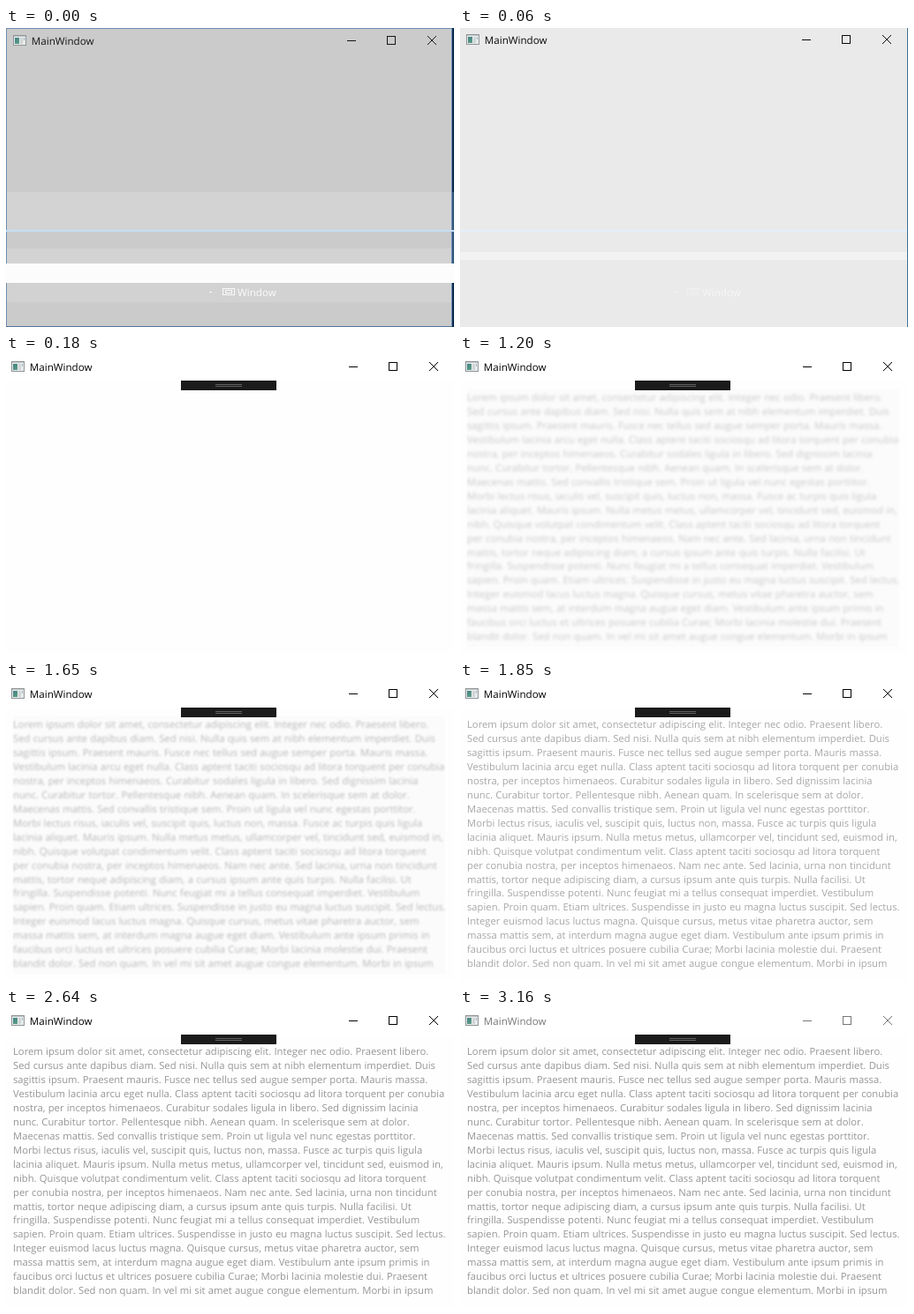
Recreate the animation shown at these times as an HTML page with a canvas. Size 507x339 px, loop 3.26 s.

```html
<!DOCTYPE html>
<html lang="en">
<head>
<meta charset="utf-8">
<title>MainWindow</title>
<style>
  html, body { margin: 0; width: 100%; height: 100%; overflow: hidden; background: #fff; }
  canvas { display: block; }
</style>
</head>
<body>
<canvas id="stage" width="507" height="339"></canvas>
<script>
const W = 507, H = 339, LOOP = 3260;
const FONT = '"Open Sans", "Noto Sans", sans-serif';
const ctx = document.getElementById('stage').getContext('2d');

const LINES = [
  'Lorem ipsum dolor sit amet, consectetur adipiscing elit. Integer nec odio. Praesent libero.',
  'Sed cursus ante dapibus diam. Sed nisi. Nulla quis sem at nibh elementum imperdiet. Duis',
  'sagittis ipsum. Praesent mauris. Fusce nec tellus sed augue semper porta. Mauris massa.',
  'Vestibulum lacinia arcu eget nulla. Class aptent taciti sociosqu ad litora torquent per conubia',
  'nostra, per inceptos himenaeos. Curabitur sodales ligula in libero. Sed dignissim lacinia',
  'nunc. Curabitur tortor. Pellentesque nibh. Aenean quam. In scelerisque sem at dolor.',
  'Maecenas mattis. Sed convallis tristique sem. Proin ut ligula vel nunc egestas porttitor.',
  'Morbi lectus risus, iaculis vel, suscipit quis, luctus non, massa. Fusce ac turpis quis ligula',
  'lacinia aliquet. Mauris ipsum. Nulla metus metus, ullamcorper vel, tincidunt sed, euismod in,',
  'nibh. Quisque volutpat condimentum velit. Class aptent taciti sociosqu ad litora torquent',
  'per conubia nostra, per inceptos himenaeos. Nam nec ante. Sed lacinia, urna non tincidunt',
  'mattis, tortor neque adipiscing diam, a cursus ipsum ante quis turpis. Nulla facilisi. Ut',
  'fringilla. Suspendisse potenti. Nunc feugiat mi a tellus consequat imperdiet. Vestibulum',
  'sapien. Proin quam. Etiam ultrices. Suspendisse in justo eu magna luctus suscipit. Sed lectus.',
  'Integer euismod lacus luctus magna. Quisque cursus, metus vitae pharetra auctor, sem',
  'massa mattis sem, at interdum magna augue eget diam. Vestibulum ante ipsum primis in',
  'faucibus orci luctus et ultrices posuere cubilia Curae; Morbi lacinia molestie dui. Praesent',
  'blandit dolor. Sed non quam. In vel mi sit amet augue congue elementum. Morbi in ipsum'
];

// Start time, blur radius and opacity of the paragraph
const FADE = [
  [1200, 1.6, .2], [1470, 1.55, .21], [1650, .9, .27], [1750, .4, .31],
  [1850, 0, .34], [1970, 0, .355], [2250, 0, .37], [2310, 0, .38],
  [2460, 0, .39], [2550, 0, .4], [2640, 0, .41]
];

function rect(x, y, w, h, color) {
  ctx.fillStyle = color;
  ctx.fillRect(x, y, w, h);
}

function text(c, str, x, y, size, color) {
  c.font = size + 'px ' + FONT;
  c.textRendering = 'geometricPrecision';
  c.fillStyle = color;
  c.fillText(str, x, y);
}

const paragraph = document.createElement('canvas');
paragraph.width = W;
paragraph.height = H;
const pen = paragraph.getContext('2d');
pen.wordSpacing = '0.35px';
LINES.forEach((line, i) => text(pen, line, 8, Math.round(51.95 + 15.961 * i), 11.26, '#000'));

function appIcon(x, y) {
  rect(x, y, 15, 12, '#8f9496');
  rect(x + 1, y + 1, 13, 10, '#e9ecec');
  rect(x + 1, y + 1, 13, 1, '#c3c9cb');
  const g = ctx.createLinearGradient(x, y + 3, x + 6, y + 10);
  g.addColorStop(0, '#3f7d84');
  g.addColorStop(1, '#5b9c86');
  rect(x + 2, y + 3, 5, 7, g);
  rect(x + 8, y + 3, 3, 7, '#d0d5d6');
  rect(x + 12, y + 3, 1, 3, '#9fb0c4');
}

// dx moves the left group, bx the buttons, dy the whole bar
function titleBar(dx, bx, dy, ink) {
  appIcon(6 + dx, 7 + dy);
  text(ctx, 'MainWindow', 26.8 + dx, 18 + dy, 11.6, ink);
  rect(388 + bx, 13 + dy, 10, 1, ink);
  ctx.strokeStyle = ink;
  ctx.lineWidth = 1;
  ctx.strokeRect(433.5 + bx, 8.5 + dy, 9, 9);
  ctx.beginPath();
  ctx.moveTo(479 + bx, 8 + dy);
  ctx.lineTo(489 + bx, 18 + dy);
  ctx.moveTo(489 + bx, 8 + dy);
  ctx.lineTo(479 + bx, 18 + dy);
  ctx.stroke();
}

function ghostLabel(x, color, dash) {
  rect(x, 299, 3, 1, color);
  ctx.strokeStyle = color;
  ctx.lineWidth = 1;
  ctx.setLineDash(dash);
  ctx.strokeRect(x + 15.5, 295.5, 13, 7);
  ctx.strokeRect(x + 18.5, 297.5, 7, 3);
  ctx.setLineDash([]);
  text(ctx, 'Window', x + 32, 304, 11.6, color);
}

function opening() {
  rect(0, 0, W, H, '#cbcbcb');
  rect(505, 0, 2, H, '#0d2a4e');
  rect(505, 186, 2, 81, '#35597f');
  rect(0, 186, 505, 43, '#d3d3d3');
  rect(0, 250, 505, 17, '#d3d3d3');
  rect(0, 289, 505, 22, '#d2d2d2');
  rect(0, 0, 505, 1, '#6f8fb0');
  rect(0, 0, 1, H, '#6f8fb0');
  rect(504, 0, 1, H, '#5f86b0');
  rect(0, 338, 505, 1, '#4f779f');
  rect(0, 229, W, 2, '#c4def5');
  rect(0, 267, W, 22, '#fcfcfc');
  titleBar(2, -2, 1, '#161616');
  ghostLabel(230, '#fbfbfb', []);
}

function growing() {
  rect(0, 0, W, H, '#eaeaea');
  rect(0, 229, W, 2, '#e3effa');
  rect(0, 254, W, 9, '#f2f2f2');
  rect(506, 0, 1, H, '#3f7096');
  titleBar(1, -1, 0, '#080808');
  ghostLabel(242, '#f6f6f6', [1, 1]);
}

function toolbar() {
  rect(198, 29, 108, 11, '#1b1b1c');
  rect(237, 33, 30, 1, '#606062');
  rect(237, 35, 30, 1, '#606062');
}

function body(t) {
  const key = FADE.filter(k => t >= k[0]).pop();
  if (!key) return;
  const [, blur, alpha] = key;
  if (blur > .5) rect(8, 39, 489, 292, '#fbfbfb');
  ctx.save();
  ctx.globalAlpha = alpha;
  if (blur) ctx.filter = `blur(${blur}px)`;
  ctx.drawImage(paragraph, 0, 0);
  ctx.restore();
}

function draw(t) {
  if (t < 60) return opening();
  if (t < 120) return growing();
  rect(0, 0, W, H, t < 180 ? '#f8f8f8' : '#fefefe');
  if (t >= 180) {
    rect(0, 0, W, 29, '#fff');
    body(t);
    toolbar();
  }
  titleBar(0, 0, 0, t < 3160 ? '#000' : '#777');
}

let start;
function tick(now) {
  start ??= now;
  draw((now - start) % LOOP);
  requestAnimationFrame(tick);
}
draw(0);
requestAnimationFrame(tick);
</script>
</body>
</html>
```
